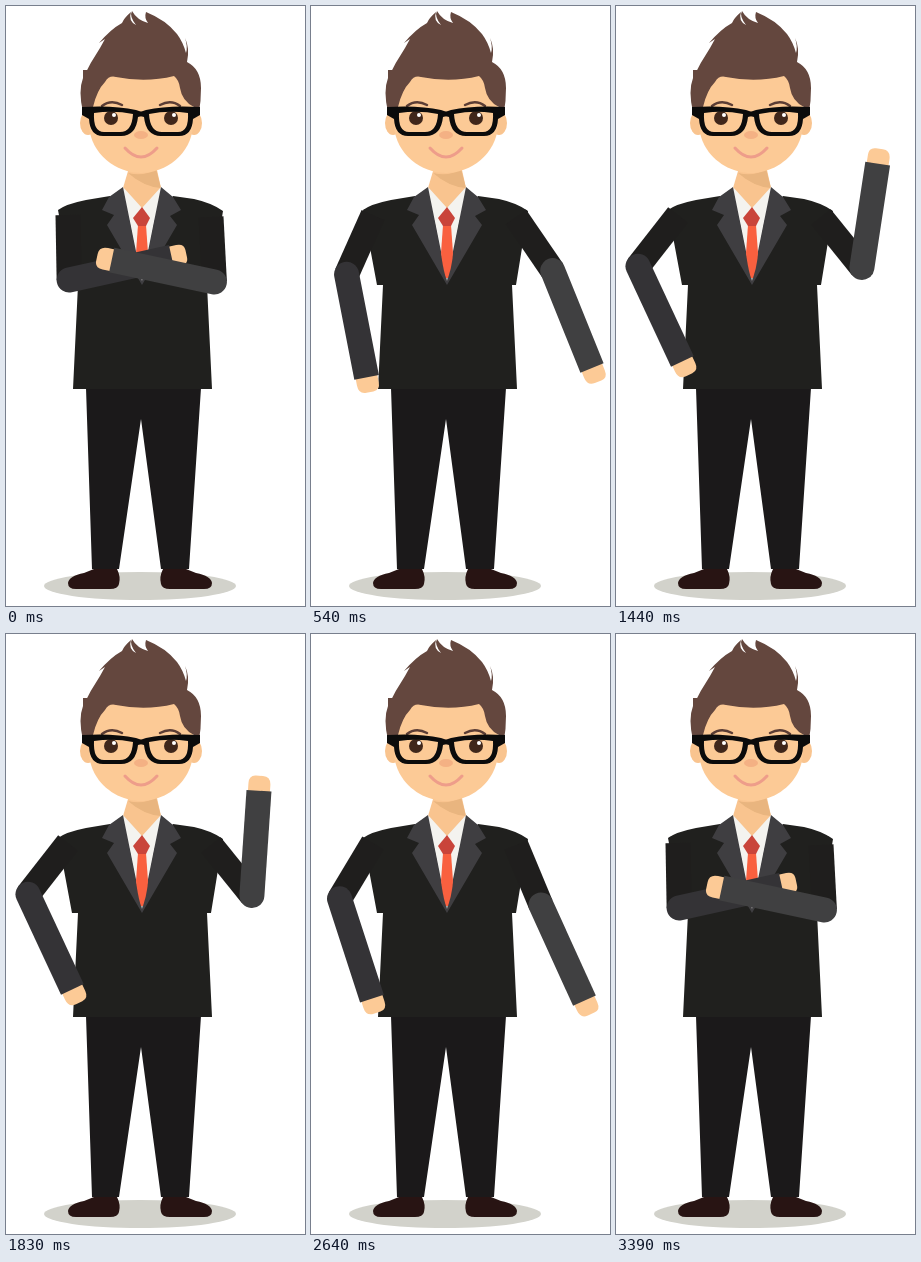
An HTML page that plays this animation: 299x600 px, repeating every 3780 ms.

```html
<!DOCTYPE html>
<html lang="en">
<head>
<meta charset="utf-8">
<title>Waving businessman</title>
<style>
  html, body { margin: 0; width: 100%; height: 100%; overflow: hidden; background: #fff; }
  svg { display: block; width: 100%; height: 100%; }
  .line { fill: none; stroke-linecap: round; }
  .skin { fill: #fcca96; }
</style>
</head>
<body>
<svg viewBox="0 0 299 600">
  <defs>
    <path id="shoe" fill="#281413" d="M62 577Q63 570 78 567L88 563H111Q115 571 113 578Q112 583 104 583H70Q62 583 62 577Z"/>
    <g id="eye">
      <path class="line" stroke="#5b3d35" stroke-width="2.5" d="M96 100Q105 93 116 99"/>
      <circle cx="105" cy="112" r="7" fill="#40271b"/>
      <path fill="#0b0b0b" fill-rule="evenodd"
        d="M76 101Q108 99 130 104L136 106V110L132 111Q130 130 115 130H97Q84 130 83 113L76 109Z
           M88 107Q108 104 127 108Q126 126 114 126H98Q87 126 88 107Z"/>
    </g>
    <rect id="upper" x="-12.5" width="25" height="65" fill="#1f1e1d"/>
    <g id="forearm">
      <path class="skin" d="M-11 102V111Q-11 120-3 120H4Q11 120 11 112V102Z"/>
      <path d="M-12.5 105V0A12.5 12.5 0 0 1 12.5 0V105Z"/>
    </g>
  </defs>

  <ellipse cx="134" cy="580" rx="96" ry="14" fill="#d2d2cb"/>
  <use href="#shoe"/>
  <use href="#shoe" transform="translate(268) scale(-1 1)"/>
  <path fill="#1b191a" d="M80 382H195L183 563H155L135 413 113 563H86Z"/>

  <path fill="#f9c48f" d="M125 155L117 182 136 204 155 182 149 155Z"/>
  <path fill="#e9b57f" d="M122 167Q138 171 150 163L155 182Q138 181 122 167Z"/>
  <path fill="#20201e" d="M104 190L80 194Q60 198 52 204L66 279H72L67 383H206L201 279H205L217 205Q206 197 188 193L167 190 136 230Z"/>
  <path fill="#f4f3ef" d="M117 181L136 202 155 181 137 276H135Z"/>
  <path fill="#3f3e41" d="M117 181L103 191 96 204 108 209 101 219 136 279 171 219 164 210 175 204 167 191 155 181 136 275Z"/>
  <path fill="#f9603f" d="M132 219L130 247Q132 263 135 272H137Q141 261 142 247L140 219Z"/>
  <path fill="#c9443a" d="M136 201L127 212 132 220H140L144 212Z"/>

  <ellipse cx="82" cy="117" rx="8" ry="12" fill="#f9c48f"/>
  <ellipse cx="188" cy="117" rx="8" ry="12" fill="#f9c48f"/>
  <path class="skin" d="M83 120C85 148 110 167 135 167S185 148 187 120V64H83Z"/>
  <path fill="#64473e" d="M77 106Q72 85 77 72Q84 57 94 42L99 33 93 37Q105 23 116 17
    Q118 12 125 6Q122 15 130 19Q123 10 126 5Q131 14 142 17Q138 12 140 6Q160 14 171 28Q177 36 180 47
    Q182 41 179 32Q184 42 181 56Q195 63 195 82Q195 95 193 106L188 101Q176 95 174 82Q173 74 168 70
    Q140 77 110 71Q103 69 99 76Q91 84 87 101L82 106ZV64H100L82 82Z"/>
  <use href="#eye"/>
  <use href="#eye" transform="translate(270) scale(-1 1)"/>
  <circle cx="108" cy="109" r="2" fill="#fff"/>
  <circle cx="168" cy="109" r="2" fill="#fff"/>
  <ellipse cx="135" cy="129" rx="7" ry="4" fill="#f4b184"/>
  <path class="line" stroke="#ee9d8a" stroke-width="3" d="M119 142Q135 160 151 142"/>

  <g id="left" transform="translate(62 209)">
    <g><use href="#upper"/><use href="#forearm" fill="#343336"/></g>
  </g>
  <g id="right" transform="translate(205 211)">
    <g><use href="#upper"/><use href="#forearm" fill="#404041"/></g>
  </g>
</svg>
<script>
const LOOP = 3780, STEP = 30, UPPER_LENGTH = 65;

// Angles are in degrees; 0 hangs straight down.
function setArm(id, upper, fore) {
  const arm = document.getElementById(id).firstElementChild;
  arm.setAttribute("transform", `rotate(${upper})`);
  arm.lastElementChild.setAttribute("transform", `translate(0 ${UPPER_LENGTH}) rotate(${fore - upper})`);
}

function draw(now) {
  const time = Math.floor(now % LOOP / STEP) * STEP;
  const ramp = (from, to) => Math.min(1, Math.max(0, (time - from) / (to - from)));

  // Left arm: unfold, rest the hand on the hip, then fold again.
  const unfold = ramp(0, 540) - ramp(2880, 3390);
  const hip = ramp(540, 1060) - ramp(2400, 2880);
  setArm("left", -1 + 25 * unfold + 14 * hip, -102.5 + 91.5 * unfold - 14 * hip);

  // Right arm: swing up, wave, drop and fold.
  const lift = 36 * ramp(0, 620) - 31 * ramp(2370, 2880) - 5 * ramp(2880, 3390);
  const swing = 124 * ramp(0, 540) + 168 * ramp(540, 1120);
  const wave = 30 * ramp(1120, 1635) - 36 * ramp(1635, 2070);
  const drop = 126 * ramp(2070, 2370) + 172 * ramp(2370, 3390);
  setArm("right", -3 - lift, 102 - swing + wave + drop);
}

const start = performance.now();
function tick() {
  draw(performance.now() - start);
  requestAnimationFrame(tick);
}
tick();
</script>
</body>
</html>
```
